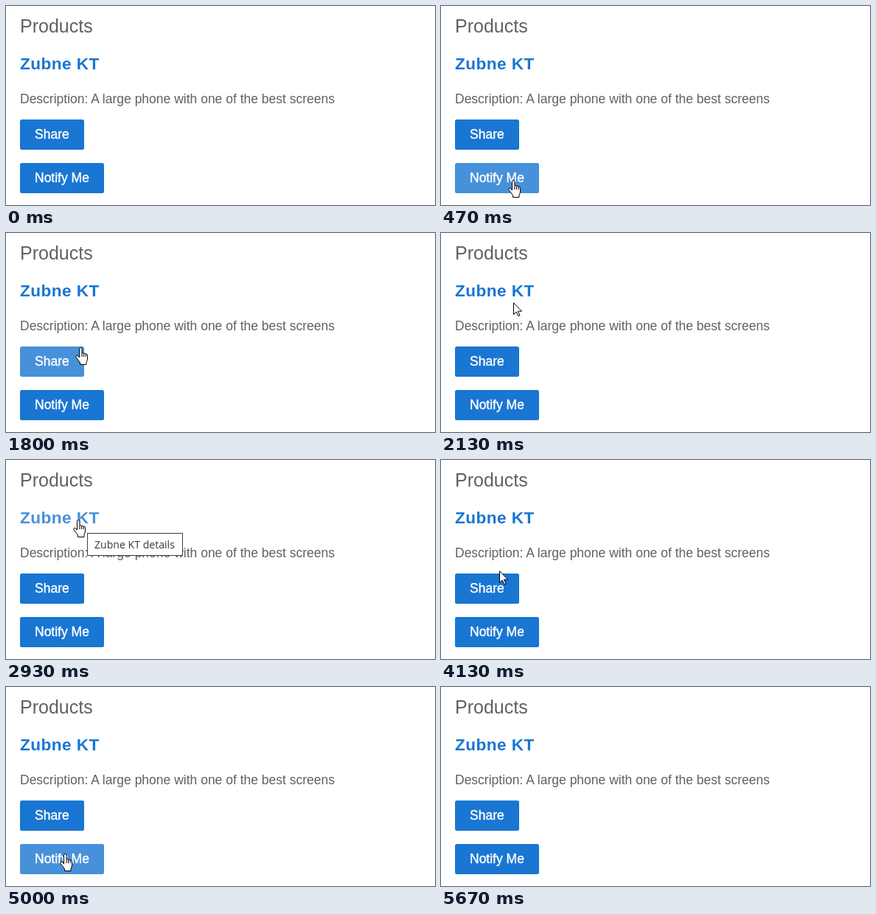
Recreate the animation shown at these times as an HTML page. Size 582 px wide and 270 px high, loop 6.19 s.

```html
<!DOCTYPE html>
<html lang="en">
<head>
<meta charset="utf-8">
<title>Product list</title>
<style>
  html, body { margin: 0; width: 100%; height: 100%; overflow: hidden; background: #fff; }
  svg { display: block; width: 582px; height: 270px; }
  text { font: 17.5px "Liberation Sans", Arial, sans-serif; fill: #616161; white-space: pre; }
  .heading { font-size: 25px; }
  .link { font-size: 22.6px; font-weight: bold; letter-spacing: .45px; fill: #1976d2; }
  .button rect { fill: #1976d2; }
  .button text { fill: #fff; stroke: #fff; stroke-width: .4px; }
  .tip rect { fill: #fff; stroke: #3c3c3c; }
  .tip text { font: 14.1px "Open Sans", "Noto Sans", sans-serif; fill: #3a3a3a; }
  .cursor { fill: #fff; stroke: #000; stroke-linejoin: round; }
</style>
</head>
<body>
<svg viewBox="0 0 582 270">
  <text class="heading" x="19" y="36">Products</text>
  <text class="link" id="title" x="19" y="86">Zubne KT</text>
  <text x="19" y="132">Description: A large phone with one of the best screens</text>
  <g class="button" id="share">
    <rect x="19" y="154" width="87" height="41" rx="2.5"/>
    <text x="39" y="180">Share</text>
  </g>
  <g class="button" id="notify">
    <rect x="19" y="213" width="114" height="41" rx="2.5"/>
    <text x="39" y="239">Notify Me</text>
  </g>
  <g class="tip" id="tip">
    <rect x="110.5" y="99.5" width="129" height="30"/>
    <text x="120" y="120">Zubne KT details</text>
  </g>
  <g class="cursor" id="cursor">
    <path id="arrow" d="M.5 .7V16.5L4.2 13L6.8 18.7L9 17.8L6.5 12.2H11.6Z"/>
    <path id="hand" transform="translate(-6 0)" d="M5.5 14V2.2a1.75 1.7 0 0 1 3.5 0V7.7q1.4-.7 2.6 .6q1.5-.6 2.6 .8q2.3-.4 2.3 2V16q0 2-1.5 4V23.5H6.5V20.8L1.3 13.9q-1.2-2 .3-2.7t3.9 2.8ZM9 7.7V13M11.6 8.3V13M14.2 9.1V13"/>
  </g>
</svg>
<script>
const LOOP = 6190;
const RATE = 15; // pointer updates per second

const linear = u => u;
const slowStart = u => u ** 1.15;
const easeOut = u => 1 - (1 - u) ** 2.15;
const smooth = u => u * u * (3 - 2 * u);

// The pointer rests between moves; times are in ticks.
const entry = { x: 96, y: 275 };
const moves = [
  { from: 3, to: 7, x: 97, y: 236, ease: linear },
  { from: 12, to: 20, x: 101, y: 174, ease: slowStart },
  { from: 26, to: 36, x: 97, y: 81, ease: easeOut },
  { from: 56, to: 62, x: 79, y: 150, ease: smooth },
  { from: 62, to: 65, x: 77, y: 171, ease: linear },
  { from: 69, to: 76, x: 79, y: 229, ease: smooth },
  { from: 80, to: 85, x: 81, y: 275, ease: linear }
];

const el = id => document.getElementById(id);
const show = (id, on) => el(id).setAttribute("visibility", on ? "visible" : "hidden");

const targets = ["title", "share", "notify"].map(id => ({ node: el(id), box: el(id).getBBox() }));
const inside = (box, { x, y }) =>
  x >= box.x && x < box.x + box.width && y >= box.y && y < box.y + box.height;

function pointerAt(tick) {
  let { x, y } = entry;
  for (const m of moves) {
    if (tick <= m.from) break;
    const u = m.ease(Math.min(1, (tick - m.from) / (m.to - m.from)));
    x += (m.x - x) * u;
    y += (m.y - y) * u;
  }
  return { x: Math.round(x), y: Math.round(y) };
}

function draw(ms) {
  const tick = Math.floor(ms * RATE / 1000 + 0.06);
  const pointer = pointerAt(tick);
  let over = false;
  for (const { node, box } of targets) {
    const hit = inside(box, pointer);
    node.setAttribute("opacity", hit ? 0.8 : 1);
    over = over || hit;
  }
  el("cursor").setAttribute("transform", `translate(${pointer.x} ${pointer.y})`);
  show("arrow", !over);
  show("hand", over);
  show("tip", tick >= 44 && tick < 57);
}

const start = performance.now();
function frame() {
  draw((performance.now() - start) % LOOP);
  requestAnimationFrame(frame);
}
frame();
</script>
</body>
</html>
```
